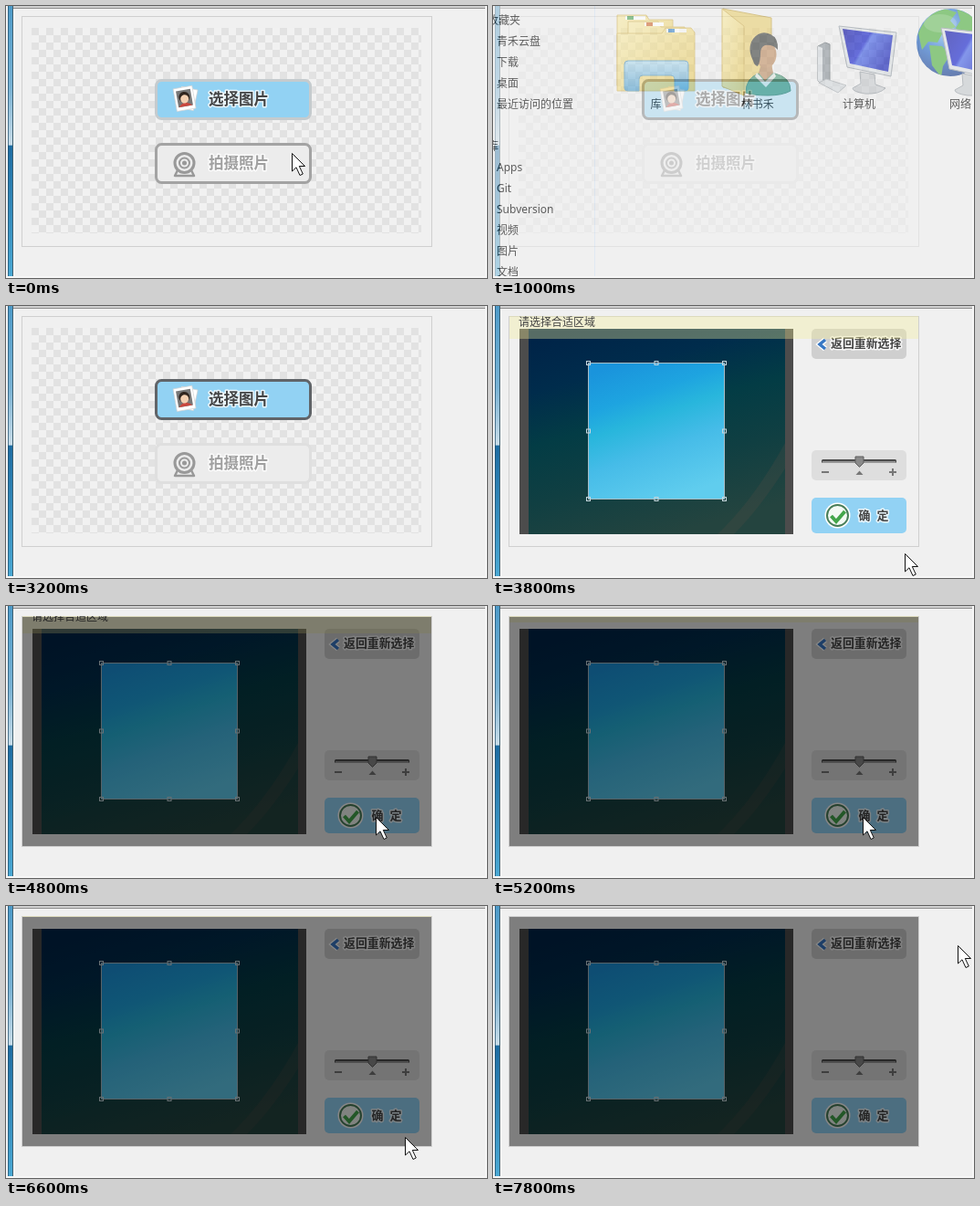
An HTML page for the animation above (8 s loop, 527 by 298 pixels).

```html
<!DOCTYPE html>
<html lang="zh">
<head>
<meta charset="utf-8">
<title>选择图片</title>
<style>
html, body { margin: 0; width: 100%; height: 100%; overflow: hidden; background: #f0f0f0; }
svg { display: block; width: 527px; height: 298px; }
text { font-family: "Noto Sans", "Noto Sans CJK SC", "Noto Sans CJK", sans-serif; font-size: 12px; }
.bold { font-family: "Noto Sans CJK SC", "Noto Sans CJK", sans-serif; font-weight: 700; }
.halo { paint-order: stroke; stroke: #fff; stroke-opacity: .8; stroke-width: 3px; stroke-linejoin: round; }
.mid { text-anchor: middle; }
</style>
</head>
<body>
<svg viewBox="0 0 527 298" xmlns="http://www.w3.org/2000/svg">
  <defs>
    <pattern id="checker" x="28" y="24" width="16" height="16" patternUnits="userSpaceOnUse">
      <rect width="16" height="16" fill="#f1f1f1"/>
      <path d="M0 0h8v8h-8zM8 8h8v8h-8z" fill="#e2e2e2"/>
    </pattern>
    <linearGradient id="edge" x2="0" y2="1">
      <stop offset="0" stop-color="#4c9ac8"/><stop offset=".3" stop-color="#78b2d4"/>
      <stop offset=".51" stop-color="#c8dce8"/><stop offset=".515" stop-color="#1d6ca2"/>
      <stop offset="1" stop-color="#4aa9d4"/>
    </linearGradient>
    <linearGradient id="shade" x1=".2" x2=".55" y2="1">
      <stop offset="0" stop-color="#002448"/><stop offset=".22" stop-color="#002c4c"/>
      <stop offset=".45" stop-color="#033c45"/><stop offset=".7" stop-color="#103f42"/>
      <stop offset="1" stop-color="#24443f"/>
    </linearGradient>
    <linearGradient id="sky" x1=".25" x2=".6" y2="1">
      <stop offset="0" stop-color="#1a94dc"/><stop offset=".25" stop-color="#1ea4e0"/>
      <stop offset=".42" stop-color="#28b6dc"/><stop offset=".65" stop-color="#46bce8"/>
      <stop offset="1" stop-color="#60cdee"/>
    </linearGradient>
    <linearGradient id="folder" x2="1" y2="1">
      <stop offset="0" stop-color="#faedaa"/><stop offset="1" stop-color="#e6c85e"/>
    </linearGradient>
    <linearGradient id="tray" x2="0" y2="1">
      <stop offset="0" stop-color="#b4dcee"/><stop offset="1" stop-color="#4c9ccc"/>
    </linearGradient>
    <linearGradient id="screen" x2="1" y2=".5">
      <stop offset="0" stop-color="#0508a0"/><stop offset=".48" stop-color="#0a18cc"/>
      <stop offset=".54" stop-color="#3c5ce8"/><stop offset="1" stop-color="#0814b4"/>
    </linearGradient>
    <radialGradient id="globe" cx=".4" cy=".3" r=".7">
      <stop offset="0" stop-color="#8ecbf8"/><stop offset=".5" stop-color="#2068cc"/>
      <stop offset="1" stop-color="#0c3488"/>
    </radialGradient>
    <clipPath id="panelClip"><rect x="18" y="11" width="448" height="253"/></clipPath>
    <clipPath id="globeClip"><circle cx="501" cy="40" r="37"/></clipPath>
    <g id="monitor">
      <path d="M26 50l16 3 1 11 11 4q-7 7-22 6-14-2-14-6l9-5z" fill="#c6cace" stroke="#959ca2"/>
      <path d="M3 0L66 7 60 55 12 45z" fill="#dde1e5" stroke="#939ca4" stroke-linejoin="round"/>
      <path d="M7 3L62 10 57 50 15 41z" fill="url(#screen)"/>
    </g>
  </defs>

  <rect width="527" height="298" fill="#f0f0f0"/>
  <g id="frame">
    <rect width="527" height="2" fill="#d0d0d0"/>
    <rect y="2" width="527" height="1" fill="#8f8f8f"/>
    <rect width="2" height="298" fill="#f0f3f5"/>
    <rect x="2" width="6" height="298" fill="url(#edge)"/>
    <rect x="2" width="1" height="298" fill="#204c68" opacity=".7"/>
    <rect x="7" width="1" height="298" fill="#41606f"/>
    <rect x="8" y="3" width="1" height="295" fill="#fafafa"/>
    <rect x="17.5" y="11.5" width="449" height="252" fill="none" stroke="#cfcfcf"/>
  </g>

  <g id="chooser">
    <rect x="28" y="24" width="427" height="225" fill="url(#checker)"/>
    <rect id="pick" x="164.5" y="81.5" width="169" height="42" rx="6" fill="#92d2f3" stroke-width="3"/>
    <g stroke="#d3d3d3" stroke-width=".7">
      <rect x="190" y="90" width="18" height="23" fill="#fff" transform="rotate(12 199 101)"/>
      <rect x="185" y="89" width="21" height="25" fill="#fff" transform="rotate(-10 195 101)"/>
    </g>
    <g transform="rotate(-10 195 101)">
      <rect x="187.5" y="92" width="16" height="18" fill="#777"/>
      <path d="M188 110q7-8 15 0z" fill="#c9473e"/>
      <circle cx="195.5" cy="100" r="6" fill="#30251f"/>
      <ellipse cx="195.5" cy="102" rx="4.5" ry="4.7" fill="#f3cfb1"/>
    </g>
    <text class="bold halo" x="222" y="108" style="font-size:16.5px" fill="#444">选择图片</text>
    <rect id="shoot" x="164.5" y="151.5" width="169" height="42" rx="6" fill="#ececec" stroke-width="3"/>
    <g fill="none" stroke="#999">
      <circle cx="195.5" cy="172" r="10.5" stroke-width="3"/>
      <circle cx="195.5" cy="172" r="5.5" stroke-width="2"/>
      <circle cx="195.5" cy="172" r="2.5" fill="#999" stroke="none"/>
      <path d="M188 180l-3 6h21l-3-6" stroke-width="2.5" stroke-linejoin="round"/>
    </g>
    <text class="bold halo" x="222" y="178" style="font-size:16.5px" fill="#a0a0a0">拍摄照片</text>
  </g>

  <g id="editor" clip-path="url(#panelClip)">
    <rect x="29" y="25" width="300" height="225" fill="#4c4c4c"/>
    <rect x="39" y="25" width="281" height="225" fill="url(#shade)"/>
    <path d="M246 250Q286 212 320 150V178Q292 222 264 250z" fill="#5a5046" opacity=".22"/>
    <rect x="104.5" y="62.5" width="149" height="149" fill="url(#sky)" stroke="#a9bcc4"/>
    <g id="grips" fill="none" stroke="#c8d8de"></g>

    <rect x="349" y="25" width="104" height="33" rx="5" fill="#cfcfcf"/>
    <path d="M364 37l-6 5 6 5" fill="none" stroke="#fff" stroke-width="6"/>
    <path d="M364 37l-6 5 6 5" fill="none" stroke="#3777c4" stroke-width="3.5"/>
    <text class="bold halo" x="370" y="45" style="font-size:12.9px" fill="#444">返回重新选择</text>
    <rect x="349" y="158" width="104" height="33" rx="5" fill="#dedede"/>
    <rect x="360" y="168" width="82" height="4" rx="1.5" fill="#4c4c4c"/>
    <rect x="361" y="170" width="80" height="2" fill="#969696"/>
    <path d="M397 165h9v7l-4.5 4.5-4.5-4.5z" fill="#8a8a8a" stroke="#5e5e5e"/>
    <path d="M360 182h8M434 182h8M438 178v8" stroke="#777" stroke-width="2"/>
    <path d="M397.5 185l4-4.5 4 4.5z" fill="#777"/>
    <rect x="349" y="210" width="104" height="39" rx="5" fill="#92d2f4"/>
    <circle cx="377.5" cy="229.5" r="14" fill="#fff"/>
    <circle cx="377.5" cy="229.5" r="11.5" fill="#f4faf4" stroke="#477d58" stroke-width="2"/>
    <path d="M370.5 230l5.5 6 9.5-11" fill="none" stroke="#43a64b" stroke-width="4"/>
    <g class="halo" fill="#444">
      <text class="bold" x="400.5" y="234" style="font-size:13px">确</text>
      <text class="bold" x="420.5" y="234" style="font-size:13px">定</text>
    </g>
    <g id="tip">
      <rect x="18" y="11" width="448" height="25" fill="#f0eb98" opacity=".36"/>
      <text x="28" y="22" fill="#444">请选择合适区域</text>
    </g>
    <rect id="dim" x="18" y="12" width="448" height="251" fill="#000" opacity=".48"/>
  </g>

  <g id="dialog">
    <rect width="527" height="298" fill="#f0f0f0"/>
    <rect x="111" width="1" height="298" fill="#d6e5f5"/>
    <g id="labels" fill="#000"></g>

    <g stroke="#cfae4e" stroke-width=".8" stroke-linejoin="round">
      <path d="M136 10h32l3 5h26v72h-61z" fill="url(#folder)"/>
      <path d="M148 17h33l3 6h26v66h-62z" fill="url(#folder)"/>
      <path d="M136 30h49l4-6h28l4 5v64h-85z" fill="url(#folder)"/>
    </g>
    <g fill="#fff">
      <rect x="145" y="11" width="22" height="4"/><rect x="166" y="18" width="21" height="4"/>
      <rect x="190" y="25" width="22" height="4"/>
    </g>
    <rect x="147" y="11" width="7" height="4" fill="#4fa558"/>
    <rect x="168" y="18" width="7" height="4" fill="#d06830"/>
    <rect x="192" y="25" width="7" height="4" fill="#3c86ca"/>
    <path d="M144 64q0-4 4-4h62q4 0 4 4v26q0 3-4 3h-11v-13q0-4-4-4h-31q-4 0-4 4v13h-12q-4 0-4-3z" fill="url(#tray)" stroke="#5599be"/>

    <path d="M252 3L305 13V84L280 96 252 89z" fill="#e9cf72" stroke="#c6a746"/>
    <path d="M251 3L275 22V98L251 88z" fill="url(#folder)" stroke="#cfae4e"/>
    <path d="M277 95q0-16 14-21h18q17 4 17 19-9 5-25 5t-24-3z" fill="#4c9a78" stroke="#367e62"/>
    <path d="M291 73l7 9 9-9-2-9h-11z" fill="#b98a60"/>
    <path d="M289 73l9 10 10-10 2 4-11 12-12-12z" fill="#e4ece6"/>
    <ellipse cx="299" cy="53" rx="11.5" ry="15" fill="#c08e62"/>
    <path d="M285 60q-7-14 0-24 8-10 19-5 9 4 8 17-5-6-14-5-5 2-5 9 0 9-3 14-4-1-5-6z" fill="#3a3c3a"/>

    <path d="M356 44l8-4 5 2v39l-8 4-5-3z" fill="#8d959b" stroke="#666e74"/>
    <path d="M356 44l5 2v39l-5-3z" fill="#d9dee2"/>
    <path d="M357 84l8-4 22 7-9 8z" fill="#d3d7da" stroke="#a5abb0"/>
    <use href="#monitor" x="376" y="22"/>

    <circle cx="501" cy="40" r="37" fill="url(#globe)"/>
    <g clip-path="url(#globeClip)" fill="#4cae3c">
      <path d="M466 30q8-22 29-27l13 4-7 9 6 7-14 6-6 11-10-1-7 9z"/>
      <path d="M478 43l14 1 9 9-8 13-2 12-10-13z"/>
      <path d="M508 3l19 8v24l-13 2-7-13 5-8z"/>
    </g>
    <ellipse cx="490" cy="19" rx="18" ry="10" fill="#fff" opacity=".18"/>
    <use href="#monitor" x="488" y="24"/>
  </g>

  <path d="M525 0h2v298H0v-2h525z" fill="#f7f7f7"/>
  <path id="cursor" d="M.5.5V20L5 15.8 9 24.5l3.3-1.5-4-8.5H14.5z" fill="#fff" stroke="#111" stroke-linejoin="round"/>
</svg>
<script>
const LOOP = 8000, STEP = 200;
const $ = id => document.getElementById(id);
const show = (id, on) => $(id).setAttribute('display', on ? 'inline' : 'none');
const NS = 'http://www.w3.org/2000/svg';

function add(parent, tag, attrs, text = '') {
  const node = document.createElementNS(NS, tag);
  for (const key in attrs) node.setAttribute(key, attrs[key]);
  node.textContent = text;
  parent.append(node);
}

const labels = $('labels');
[['收藏夹', -6, 20], ['青禾云盘', 4, 43], ['下载', 4, 66], ['桌面', 4, 89],
 ['最近访问的位置', 4, 112], ['库', -6, 158], ['Apps', 4, 181], ['Git', 4, 204],
 ['Subversion', 4, 227], ['视频', 4, 250], ['图片', 4, 273], ['文档', 4, 296]
].forEach(([name, x, y]) => add(labels, 'text', { x, y }, name));
['库', '林书禾', '计算机', '网络'].forEach((name, i) =>
  add(labels, 'text', { x: 178.5 + i * 111.2, y: 112, class: 'mid' }, name));

for (let i = 0; i < 9; i++) {
  if (i === 4) continue;
  add($('grips'), 'rect', {
    x: 102.5 + i % 3 * 74.5, y: 60.5 + Math.floor(i / 3) * 74.5, width: 4, height: 4
  });
}

// time, x, y
const path = [
  [0, 313, 161], [200, 309, 149], [400, 303, 122], [600, 297, 100],
  [3600, 468, 276], [3800, 451, 271], [4000, 430, 255], [4200, 409, 236],
  [4400, 405, 231], [5600, 405, 231], [6600, 437, 253], [7000, 458, 270],
  [7200, 480, 232], [7600, 506, 72], [7800, 509, 43], [8000, 509, 43]
];
// time, visible height of the tip
const tipKeys = [[0, 25], [4600, 25], [5200, 7], [5400, 1], [6600, 1], [6800, 0], [8000, 0]];

function sample(keys, t) {
  const i = Math.max(1, keys.findIndex(key => key[0] > t));
  const a = keys[i - 1], b = keys[i];
  const k = (t - a[0]) / (b[0] - a[0]);
  return a.slice(1).map((v, n) => v + (b[n + 1] - v) * k);
}

function draw(time) {
  const t = Math.floor(time % LOOP / STEP) * STEP;
  const editing = t >= 3600;
  const [x, y] = t >= 600 && t < 3600 ? [297, 100] : sample(path, t);

  show('chooser', !editing);
  show('editor', editing);
  show('dialog', t >= 1000 && t < 3200);
  $('dialog').setAttribute('opacity', t < 1200 ? 0.6 : 1);
  show('dim', t >= 4800);

  const overPick = y < 125, overShoot = y > 150;
  $('pick').setAttribute('stroke', overPick ? '#606468' : '#c5cbce');
  $('shoot').setAttribute('stroke', overShoot ? '#a3a3a3' : '#dfdfdf');

  const [tip] = sample(tipKeys, t);
  $('tip').setAttribute('transform', `translate(0 ${tip - 25})`);

  show('cursor', t < 1000 || editing);
  $('cursor').setAttribute('transform', `translate(${Math.round(x)} ${Math.round(y)})`);
}

const start = performance.now();
function tick() {
  draw(performance.now() - start);
  requestAnimationFrame(tick);
}
tick();
</script>
</body>
</html>
```
